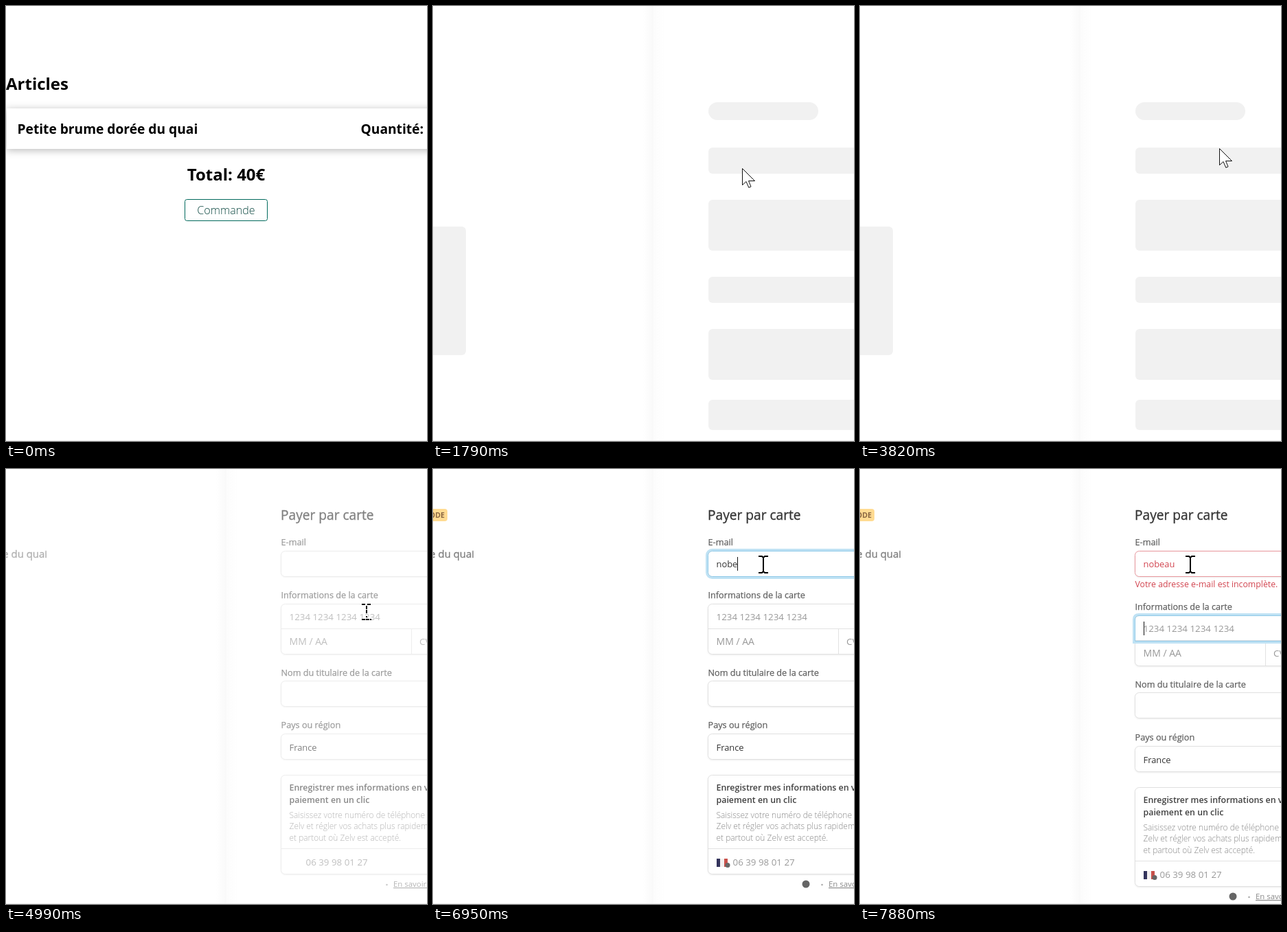
An HTML page that plays this animation: 613x633 px, repeating every 8000 ms.

```html
<!DOCTYPE html>
<html lang="fr">
<head>
<meta charset="utf-8">
<title>Paiement</title>
<style>
html, body { margin: 0; width: 100%; height: 100%; overflow: hidden; background: #fff; }
svg { display: block; width: 613px; height: 633px; font-family: "Open Sans", "Noto Sans", sans-serif; }
.bold { font-weight: 700; }
.medium { stroke-width: .35; }
.title { font-size: 19.15px; fill: #363636; stroke: #363636; }
.item { font-size: 14.9px; fill: #808080; stroke: #808080; }
.label { font-size: 12.68px; fill: #606060; stroke: #606060; stroke-width: .25; }
.hint { font-size: 13.35px; fill: #999; }
.value { font-size: 12.9px; fill: #333; }
.strong { font-size: 12.4px; font-weight: 600; fill: #404040; }
.note { font-size: 11.95px; font-weight: 300; fill: #888; }
.small { font-size: 11.4px; fill: #888; }
.box { fill: #fff; stroke: #e0e0e0; filter: drop-shadow(0 1px 1px rgba(0, 0, 0, .07)); }
.rule { stroke: #e2e2e2; }
.bone { fill: #f1f1f1; }
.ring { fill: none; stroke: #bfe2f4; stroke-width: 3; }
.edge { fill: none; stroke: #8fc9e8; }
.caret { stroke: #111; }
</style>
</head>
<body>
<svg viewBox="0 0 613 633">
  <defs>
    <linearGradient id="fold">
      <stop offset="0" stop-color="#fff"/>
      <stop offset=".46" stop-color="#f9f9f9"/>
      <stop offset=".47" stop-color="#fcfcfc"/>
      <stop offset="1" stop-color="#fff"/>
    </linearGradient>
  </defs>

  <g id="cart">
    <text class="bold" x="0" y="122" font-size="24">Articles</text>
    <rect x="1" y="149" width="640" height="59" fill="#fff" style="filter:drop-shadow(0 2px 6px rgba(0,0,0,.28))"/>
    <g class="bold" font-size="19.2">
      <text x="16.5" y="186">Petite brume dorée du quai</text>
      <text x="516.5" y="186">Quantité: 1</text>
    </g>
    <text class="bold" x="320.5" y="254" font-size="24" text-anchor="middle">Total: 40€</text>
    <rect id="button" x="260.5" y="281.5" width="120" height="31" rx="3" stroke="#00695c"/>
    <text id="order" x="320.5" y="303" font-size="16.1" text-anchor="middle">Commande</text>
  </g>

  <g id="checkout">
    <rect x="306" width="32" height="632" fill="url(#fold)"/>
    <g id="bones"></g>
    <g id="form">
      <text class="item medium" x="60" y="129" text-anchor="end">Petite brume dorée du quai</text>
      <text class="title medium" x="400" y="74">Payer par carte</text>
      <text class="label" x="400.5" y="111">E-mail</text>
      <rect id="mail" class="box" x="400.5" y="119.5" width="240" height="37" rx="6"/>
      <g id="mailFocus">
        <rect class="ring" x="398.5" y="117.5" width="240" height="41" rx="8"/>
        <rect class="edge" x="400.5" y="119.5" width="240" height="37" rx="6"/>
      </g>
      <text id="typed" class="value" x="412.5" y="143"></text>
      <path id="mailCaret" class="caret" d="M0 128V148"/>
      <text id="error" x="400.5" y="172" font-size="12.3" fill="#d2444f">Votre adresse e-mail est incomplète.</text>
      <g id="card">
        <text class="label" x="400.5" y="188">Informations de la carte</text>
        <rect class="box" x="400.5" y="196.5" width="240" height="73" rx="6"/>
        <path class="rule" d="M401 232.5H613M590.5 233V269"/>
        <g id="cardFocus">
          <path class="ring" d="M613 194.5H406Q398.5 194.5 398.5 202V235.5H613"/>
          <path class="edge" d="M613 196.5H406Q400.5 196.5 400.5 202V233.5H613"/>
          <path class="caret" d="M413.5 205V225"/>
        </g>
        <text class="hint" x="412.5" y="220">1234 1234 1234 1234</text>
        <text class="hint" x="412.5" y="256" style="font-size:14px">MM / AA</text>
        <text class="hint" x="602" y="256">CVC</text>
        <text class="label" x="400.5" y="301">Nom du titulaire de la carte</text>
        <rect class="box" x="400.5" y="308.5" width="240" height="37" rx="6"/>
      </g>
      <g id="lower">
        <text class="label" x="400.5" y="377">Pays ou région</text>
        <rect class="box" x="400.5" y="385.5" width="240" height="37" rx="6"/>
        <text class="value" x="412.5" y="410">France</text>
        <rect class="box" x="400.5" y="445.5" width="240" height="144" rx="6"/>
        <path class="rule" d="M401 552.5H613"/>
        <text class="strong" x="412.5" y="468">Enregistrer mes informations en vue</text>
        <text class="strong" x="412.5" y="486">paiement en un clic</text>
        <text class="note" x="412.5" y="508">Saisissez votre numéro de téléphone</text>
        <text class="note" x="412.5" y="524">Zelv et régler vos achats plus rapidement</text>
        <text class="note" x="412.5" y="541">et partout où Zelv est accepté.</text>
        <text class="hint" x="436.5" y="577">06 39 98 01 27</text>
        <g id="more">
          <circle cx="554.5" cy="605" r="1.3" fill="#aaa"/>
          <text class="small" x="564" y="608" text-decoration="underline">En savoir plus</text>
        </g>
        <g class="late">
          <path d="M413 567H418V579H413Z" fill="#34345c"/>
          <path d="M418 567H424V579H418Z" fill="#f3f0f0"/>
          <path d="M424 567H429V579H424Z" fill="#c9504a"/>
          <circle cx="429" cy="576.5" r="3.5" fill="#666"/>
          <circle cx="543" cy="604" r="5.5" fill="#666"/>
        </g>
      </g>
      <g class="late">
        <rect x="-60" y="58" width="81" height="18" rx="4" fill="#ffdb92"/>
        <text class="bold" x="17" y="71" font-size="10.6" fill="#8b6844" text-anchor="end">TEST MODE</text>
      </g>
    </g>
  </g>

  <path d="M0 632.5H613" stroke="#efefef"/>
  <path id="arrow" d="M.5 .5V24.5L6 19.5L9.8 28.2L13 26.8L9.5 18.5H18.5Z" fill="#fff" stroke="#111"/>
  <g id="beam" fill="none" stroke="#000" stroke-width="2">
    <path id="beamFull" d="M-7 -11H-2L0 -9L2 -11H7M0 -9V11M-7 13H-2L0 11L2 13H7"/>
    <path id="beamText" d="M-7 -10H-1M1 -10H7M0 -8V4M0 7V9M-7 12H7" stroke-dasharray="5 1"/>
  </g>
</svg>
<script>
const LOOP = 8000;
const $ = id => document.getElementById(id);
const set = (id, attrs) => { for (const k in attrs) $(id).setAttribute(k, attrs[k]); };
const show = (id, on) => set(id, { opacity: +on });
const ramp = (t, a, b) => Math.min(1, Math.max(0, (t - a) / (b - a)));
const ease = u => u * u * (3 - 2 * u);

// time, x, y of the pointer
const path = [
  [130, 469, 597], [360, 400, 455], [500, 350, 345], [620, 320, 283], [820, 314, 307],
  [1100, 314, 307], [1170, 324, 301], [1300, 324, 301], [1750, 440, 240], [2140, 531, 200],
  [2280, 512, 189], [2490, 522, 217], [2690, 523, 217], [3460, 524, 212], [3530, 524, 212],
  [3600, 524, 207], [3750, 524, 207], [3820, 523, 207], [5270, 523, 207], [5760, 479, 138]
];
const word = "nobeau";
const keys = [6620, 6690, 6820, 6950, 7150, 7350];
const SWAP = 1750, FOCUS = 5700, TAB = 7550;

const bones = [[401, 140, 160, 26, 13], [401, 206, 240, 38, 6], [401, 282, 240, 74, 6],
  [401, 394, 240, 38, 6], [401, 470, 240, 74, 6], [401, 573, 240, 44, 6], [-140, 321, 188, 187, 6]];
$("bones").innerHTML = bones.map(([x, y, w, h, r]) =>
  `<rect class="bone" x="${x}" y="${y}" width="${w}" height="${h}" rx="${r}"/>`).join("");

function pointer(t) {
  const i = path.findIndex(p => p[0] > t);
  if (i < 0) return path[path.length - 1].slice(1);
  if (!i) return path[0].slice(1);
  const [a, b] = [path[i - 1], path[i]];
  const u = ramp(t, a[0], b[0]);
  return [1, 2].map(k => a[k] + (b[k] - a[k]) * u);
}

function drawCart(t, x, y) {
  const hover = t >= 130 && x >= 260 && x <= 381 && y >= 281 && y <= 313;
  show("cart", t < SWAP);
  set("button", { fill: hover ? "#00695c" : "#fff" });
  set("order", { fill: hover ? "#fff" : "#0f4a43", "font-weight": hover ? 400 : 300 });
}

function drawCheckout(t) {
  const tabbed = t >= TAB;
  const slide = ease(ramp(t, TAB - 60, 7880)) * tabbed;
  const late = ramp(t, 5320, 5480);
  show("checkout", t >= SWAP);
  show("bones", 1 - ramp(t, 4200, 4560));
  show("form", 0.62 * ramp(t, 4200, 4990) + 0.38 * ramp(t, 4990, 5220));
  document.querySelectorAll(".late").forEach(e => e.setAttribute("opacity", late));
  set("more", { transform: `translate(${late > 0 ? 12 : 0})` });

  show("mailFocus", t >= FOCUS && !tabbed);
  $("mail").style.stroke = tabbed ? "#e8969c" : "";
  $("typed").style.fill = tabbed ? "#d2444f" : "";
  $("typed").textContent = word.slice(0, keys.filter(k => t >= k).length);
  const end = $("typed").textContent ? 412.5 + $("typed").getComputedTextLength() : 413;
  set("mailCaret", { transform: `translate(${Math.floor(end) + 0.5})` });
  show("mailCaret", t >= FOCUS && !tabbed && (t < 6220 || t >= keys[0]));
  show("error", slide);
  show("cardFocus", tabbed);
  set("card", { transform: `translate(0 ${17 * slide})` });
  set("lower", { transform: `translate(0 ${18 * slide})` });
}

function draw(t) {
  const [x, y] = pointer(t).map(Math.round);
  const beam = t >= 4500;
  const overText = beam && y > 197;
  drawCart(t, x, y);
  drawCheckout(t);
  show("arrow", t >= 130 && !beam);
  set("arrow", { transform: `translate(${x} ${y})` });
  show("beam", beam);
  set("beam", { transform: `translate(${x + 2} ${y})` });
  show("beamFull", !overText);
  show("beamText", overText);
}

const start = performance.now();
(function tick() {
  draw((performance.now() - start) % LOOP);
  requestAnimationFrame(tick);
})();
</script>
</body>
</html>
```
